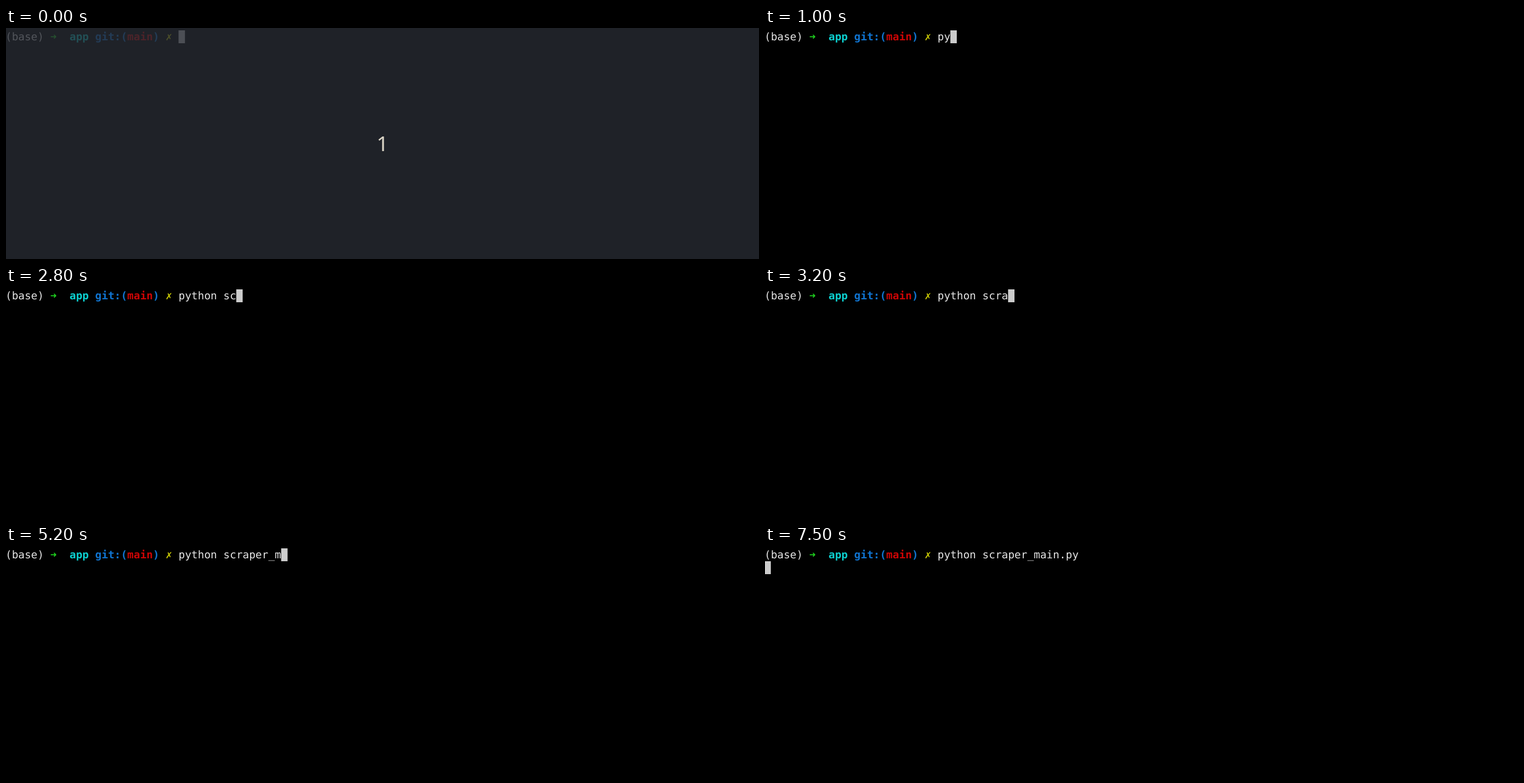
These frames come from a looping animation (1280x394 px, 8000 ms). An HTML page with a canvas:

```html
<!DOCTYPE html>
<html lang="en">
<head>
<meta charset="utf-8">
<title>Terminal typing</title>
<style>
  html, body { margin: 0; width: 100%; height: 100%; overflow: hidden; background: #000; }
  canvas { display: block; }
</style>
</head>
<body>
<canvas id="stage" width="1280" height="394"></canvas>
<script>
const ctx = document.getElementById('stage').getContext('2d');
const LOOP = 8000, LEFT = -1, CELL = 10.9, LINE = 22, TOP = 4, BASELINE = 21;
const FONT = '18.1px "DejaVu Sans Mono", monospace';
const TEXT = '#e5e5e5', CURSOR = '#cccccc';

const prompt = [
  ['(base) ', TEXT],
  ['➜  ', '#1fd01f', true],
  ['app ', '#0ccfcf', true],
  ['git:(', '#1074d0', true],
  ['main', '#cd0505', true],
  [') ', '#1074d0', true],
  ['✗ ', '#cdcd05', true],
];
const command = 'python scraper_main.py';
const keyTimes = [700, 1000, 1400, 1500, 1700, 1800, 2300, 2500, 2800, 3100, 3200,
  3700, 3900, 4000, 4700, 5200, 5400, 5700, 5800, 6100, 6600, 6700];
const COUNTDOWN_END = 100, ENTER = 7500;
const cursorGaps = [[500, 700], [7300, ENTER]];

// Keeps glyphs at fractional positions instead of snapping them to pixels.
ctx.textRendering = 'geometricPrecision';

const columnX = column => LEFT + column * CELL;

function write(text, column, color, bold) {
  ctx.font = (bold ? 'bold ' : '') + FONT;
  ctx.fillStyle = color;
  [...text].forEach((char, i) => ctx.fillText(char, columnX(column + i), BASELINE));
  return column + text.length;
}

function drawCursor(column, row) {
  ctx.fillStyle = CURSOR;
  ctx.fillRect(columnX(column), TOP + row * LINE, CELL, LINE);
}

function drawCountdown() {
  ctx.fillStyle = 'rgba(40, 44, 52, 0.78)';
  ctx.fillRect(0, 0, 1280, 394);
  ctx.font = '35px "Noto Sans", sans-serif';
  ctx.fillStyle = '#dcd6c8';
  ctx.textAlign = 'center';
  ctx.fillText('1', 640, 210);
  ctx.textAlign = 'left';
}

function draw(time) {
  ctx.fillStyle = '#000';
  ctx.fillRect(0, 0, 1280, 394);

  let column = 0;
  for (const [text, color, bold] of prompt) column = write(text, column, color, bold);
  const typed = keyTimes.filter(key => key <= time).length;
  column = write(command.slice(0, typed), column, TEXT);

  const hidden = cursorGaps.some(([from, to]) => time >= from && time < to);
  if (time >= ENTER) drawCursor(0, 1);
  else if (!hidden) drawCursor(column, 0);

  if (time < COUNTDOWN_END) drawCountdown();
}

const start = performance.now();
function frame() {
  draw((performance.now() - start) % LOOP);
  requestAnimationFrame(frame);
}
frame();
</script>
</body>
</html>
```
